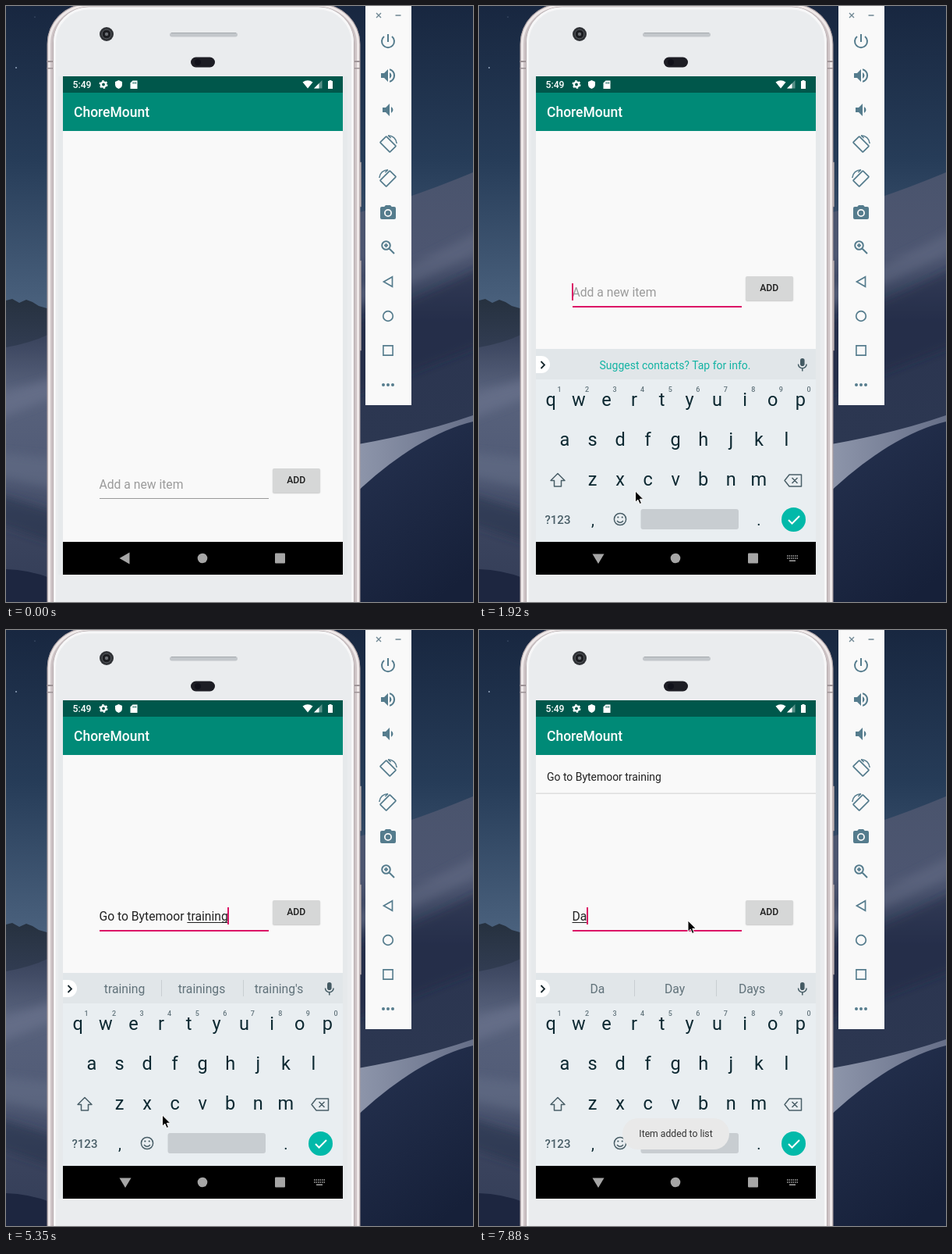
Animation of 599x763 px, one loop 8 s. Source, as an HTML page:

```html
<!DOCTYPE html>
<html lang="en">
<head>
<meta charset="utf-8">
<title>To-do app demo</title>
<style>
html, body { margin: 0; width: 100%; height: 100%; overflow: hidden; background: #1a2740; }
#stage { position: relative; width: 599px; height: 763px; overflow: hidden; font-family: Roboto, sans-serif; }
svg { position: absolute; left: 0; top: 0; }
text { font-family: Roboto, sans-serif; }
#form { position: absolute; left: 0; top: 0; width: 599px; height: 763px; }
#form.up { transform: translateY(-246px); }
#line { position: absolute; left: 119.5px; top: 630px; width: 217.5px; height: 1px; background: #999; }
#form.focus #line { height: 2px; background: #dc1466; }
#field { position: absolute; left: 119.5px; top: 601px; height: 22px; font-size: 15.7px; line-height: 23px; white-space: pre; color: #222; }
#hint { position: absolute; left: 0; top: 0; color: #9b9b9b; }
#word { text-decoration: underline 1px; text-underline-offset: 2px; text-decoration-skip-ink: none; }
#caret { position: absolute; top: 0; margin-left: -.5px; width: 2px; height: 22px; background: #dc1466; }
#add { position: absolute; left: 342px; top: 592px; width: 60.5px; height: 30.500px; border-radius: 2px; background: #d6d7d7; box-shadow: 0 1px 1.5px #0003; font-weight: 500; font-size: 12.2px; line-height: 31px; text-align: center; color: #1f1f1f; }
#add.press { background: #bfc0c0; box-shadow: 0 2px 4px #0006; }
</style>
</head>
<body>
<div id="stage">
<svg id="scene" width="599" height="763" viewBox="0 0 599 763">
  <defs>
    <linearGradient id="sky" x2="0" y2="390" gradientUnits="userSpaceOnUse">
      <stop stop-color="#182740"/><stop offset=".5" stop-color="#263c58"/><stop offset="1" stop-color="#4b627e"/>
    </linearGradient>
    <linearGradient id="hills" x2="0" y2="1">
      <stop stop-color="#26313f"/><stop offset="1" stop-color="#323d53"/>
    </linearGradient>
    <linearGradient id="duneL" x2="0" y1="425" y2="763" gradientUnits="userSpaceOnUse">
      <stop stop-color="#3a445d"/><stop offset=".2" stop-color="#58627c"/><stop offset=".5" stop-color="#515b76"/><stop offset=".75" stop-color="#3a435d"/><stop offset="1" stop-color="#333d57"/>
    </linearGradient>
    <linearGradient id="duneR" x2="0" y1="215" y2="560" gradientUnits="userSpaceOnUse">
      <stop stop-color="#4a546d"/><stop offset=".3" stop-color="#4d5671"/><stop offset=".55" stop-color="#2b3550"/><stop offset="1" stop-color="#2c3751"/>
    </linearGradient>
    <linearGradient id="glow" x1="453" x2="599" gradientUnits="userSpaceOnUse">
      <stop stop-color="#8d95aa"/><stop offset="1" stop-color="#666f88"/>
    </linearGradient>
    <linearGradient id="front" x1="470" y1="590" x2="580" y2="740" gradientUnits="userSpaceOnUse">
      <stop stop-color="#222e4b"/><stop offset="1" stop-color="#162039"/>
    </linearGradient>
    <filter id="soft" x="-50%" y="-50%" width="200%" height="200%"><feGaussianBlur stdDeviation="6"/></filter>
  </defs>

  <g id="wallpaper">
    <path fill="url(#sky)" d="M0 0H599V763H0z"/>
    <circle cx="13" cy="79" r=".9" fill="#9fb0c8"/><circle cx="37" cy="14" r=".6" fill="#6f819c"/>
    <path fill="url(#hills)" d="M0 377l8-2 9 5 9-4 8 3 8 5 14 4V440H0z"/>
    <path fill="url(#duneL)" d="M0 437Q30 432 56 420V763H0z"/>
    <g filter="url(#soft)">
      <path fill="#6d768f" opacity=".6" d="M-20 500Q30 488 70 472V498L-20 532z"/>
      <path fill="#66708a" opacity=".5" d="M-20 570L70 580V620L-20 600z"/>
      <path fill="#2a334b" opacity=".6" d="M-20 622L70 650V690L-20 660z"/>
    </g>
    <path fill="#1d2640" d="M0 721Q30 722 56 732V763H0z"/>
    <path fill="url(#duneR)" d="M440 268Q520 246 599 213V763H440z"/>
    <g filter="url(#soft)">
      <path fill="#676f87" opacity=".5" d="M440 365Q530 330 620 280V306Q540 352 440 388z"/>
      <path fill="#1e2842" opacity=".55" d="M440 410Q530 375 620 330V430L440 500z"/>
    </g>
    <path fill="url(#glow)" d="M440 563Q530 548 599 524V540L440 680z"/>
    <path fill="url(#front)" d="M440 632Q480 592 525 564Q565 540 599 532V763H440z"/>
  </g>

  <g id="phone">
    <path fill="#d6cdce" stroke="#93898c" stroke-width=".6" d="M335 -2h9v4h-9zM451 200h4.500v57H451zM451 326h4.500v115H451z"/>
    <rect x="53" y="-2.500" width="401" height="830" rx="51" fill="#cdc3c5" stroke="#a89ea1"/>
    <rect x="55.500" y="0" width="396" height="830" rx="49" fill="none" stroke="#efe9e9" stroke-width="3"/>
    <path fill="#9e9497" d="M52.500 70h8v2h-8zm0 9h8v1.500h-8zM446 70h8v2h-8zm0 9h8v1.500h-8z"/>
    <rect x="60.500" y="1" width="386" height="830" rx="46" fill="#eaecee" stroke="#b5abad"/>
    <rect x="62.500" y="3" width="382" height="830" rx="44" fill="none" stroke="#f7f7f8" stroke-width="3"/>
    <path fill="#e6e9eb" d="M67 90h6v638h-6zM432 90h6v638h-6z"/>
    <circle cx="129" cy="36" r="9" fill="#303236"/><circle cx="129" cy="36" r="5.800" fill="#1b1c20" stroke="#56595e"/>
    <circle cx="129" cy="36" r="2.200" fill="#6b6e73"/>
    <rect x="210" y="34" width="87" height="5.500" rx="2.700" fill="#c3c7cb"/><path stroke="#a5a9ae" d="M212 34.500h83"/>
    <rect x="237" y="65.500" width="31" height="13" rx="6.500" fill="#1d1d24"/><circle cx="246" cy="72" r="4" fill="#11111a"/>
  </g>

  <g id="app">
    <path fill="#f9f9f9" d="M73 90h359v638H73z"/>
    <path fill="#00574b" d="M73 90h359v21H73z"/>
    <path fill="#008a77" d="M73 111h359v49H73z"/>
    <g fill="#fff">
      <text x="85.500" y="105" font-size="12.2" font-weight="500">5:49</text>
      <text x="87" y="142" font-size="17.5" font-weight="500">ChoreMount</text>
      <circle cx="125" cy="100.500" r="3.100" fill="none" stroke="#fff" stroke-width="2.400"/>
      <circle cx="125" cy="100.500" r="4.700" fill="none" stroke="#fff" stroke-width="1.600" stroke-dasharray="2.460"/>
      <path d="M144.500 95l4.500 2v3.500q0 4-4.500 5.500q-4.500-1.500-4.500-5.500V97z"/>
      <path d="M162.500 95.500h6v10.500h-9v-7.500z"/><path fill="#00574b" d="M162.500 97.500h1v2h-1zm1.800 0h1v2h-1zm1.800 0h1v2h-1z"/>
      <path d="M380.500 97.500q6.500-4.500 13 0L387 105.500z"/>
      <path d="M405.500 95v10.500H395z" opacity=".35"/><path d="M401.500 99v6.500H395z"/>
      <path d="M414.500 95h3v1h1.500v10h-6V96h1.500z"/>
    </g>
    <g id="item">
      <text x="87" y="193" font-size="13.95" fill="#212121">Go to Bytemoor training</text>
      <path fill="#dedede" d="M73 208.500h359v1.500H73z"/>
    </g>
  </g>

  <g id="keyboard">
    <path fill="#e9eef1" d="M73 439h359v247H73z"/>
    <path fill="#e1e6e9" d="M73 439h359v39H73z"/>
    <path fill="#fff" d="M73 448h7a11 11 0 0 1 0 22h-7z"/>
    <path fill="none" stroke="#16262c" stroke-width="1.800" d="M79.500 455l4.500 4.500-4.500 4.500"/>
    <g fill="#445a63"><rect x="412" y="451" width="5.600" height="10" rx="2.800"/>
      <path fill="none" stroke="#445a63" stroke-width="1.500" d="M409.500 458.500a5.300 5.300 0 0 0 10.600 0M414.800 464v3.500"/></g>
    <text id="tip" x="251.500" y="464.500" font-size="14" text-anchor="middle" fill="#12b3a3">Suggest contacts? Tap for info.</text>
    <g id="words" font-size="15.7" text-anchor="middle" fill="#61727a">
      <path stroke="#c8ced2" d="M199.500 448v21M304.500 448v21"/>
      <text x="152" y="465"/><text x="251" y="465"/><text x="350" y="465"/>
    </g>
    <g id="keys" font-size="23.500" text-anchor="middle" fill="#0c2831"></g>
    <g fill="none" stroke="#4a5f68" stroke-width="1.500" stroke-linejoin="round">
      <path d="M101 598.500l9 9h-4.500v7.500h-9v-7.500H92z"/>
      <path d="M398 600h15.500v15H398l-6-7.500zM401.500 604l7 7m0-7l-7 7"/>
      <circle cx="181" cy="657" r="7.600"/><path d="M177 659q4 4.500 8 0"/>
      <path stroke-width="2.200" stroke-linecap="round" d="M178.300 654.500h.1M183.700 654.500h.1"/>
    </g>
    <text x="101" y="662.500" font-size="15" font-weight="500" text-anchor="middle" fill="#4a5f68">?123</text>
    <rect x="207.500" y="644" width="125.500" height="26" rx="3" fill="#c8cdd1"/>
    <circle cx="403.500" cy="657.500" r="15.500" fill="#02b9a9"/>
    <path fill="none" stroke="#fff" stroke-width="2" d="M397 658l4.500 4.500 9.500-9.500"/>
  </g>

  <g id="toast">
    <rect x="184" y="625" width="137" height="40" rx="20" fill="#e9e9e9"/>
    <text x="252.500" y="649" font-size="12.200" text-anchor="middle" fill="#333">Item added to list</text>
  </g>

  <g id="nav" fill="#a6a6a6">
    <path fill="#000" d="M73 686h359v42H73z"/>
    <circle cx="252" cy="707" r="6.300"/><rect x="345" y="700.500" width="13" height="13" rx="1"/>
    <path id="back" d="M145.500 707l13-7.500v15z"/>
    <g id="down"><path d="M145.500 701.500h15l-7.500 12.500z"/>
      <path stroke="#a6a6a6" stroke-width="1.500" stroke-dasharray="1.500 1" d="M395 704h14M395 707h14"/><path d="M398 709.500h8v1.500h-8z"/></g>
  </g>

  <g id="tools">
    <path fill="#f9f9f9" d="M461 0h59V511h-59z"/>
    <path fill="none" stroke="#6f8793" stroke-width="1.400" d="M475 9l6 6m0-6l-6 6M499.500 12h7"/>
  </g>
</svg>

<div id="form">
  <div id="field"><span id="hint">Add a new item</span><span id="text"></span><span id="word"></span><span id="caret"></span></div>
  <div id="line"></div>
  <div id="add">ADD</div>
</div>

<svg id="pointer" width="14" height="20" viewBox="-1 -1 14 20">
  <path d="M0 0V14.200L3.300 11.200L5.600 16.500L8 15.500L5.800 10.300H10.300z" stroke="#fff" stroke-width="1"/>
</svg>
</div>

<script>
const $ = id => document.getElementById(id);
const show = (id, on) => { $(id).style.display = on ? '' : 'none'; };

// Keyboard letters
const label = (x, y, s, extra = '') => `<text x="${x}" y="${y}" ${extra}>${s}</text>`;
const row = (chars, x, y) => [...chars].map((c, i) => label(x + i * 35.55, y, c)).join('');
const hints = [...'1234567890'].map((c, i) =>
  label(103 + i * 35.55, 494, c, 'font-size="9" font-weight="500" fill="#62747c"')).join('');
$('keys').innerHTML = row('qwertyuiop', 92.3, 511.5) + hints + row('asdfghjkl', 110, 563) +
  row('zxcvbnm', 145.5, 614) + label(146, 665, ',', 'font-size="20"') + label(359, 665, '.', 'font-size="20"');

// Emulator toolbar, 24-unit icons
const stroke = (d, w = 2) => `<path fill="none" stroke="#557c8d" stroke-width="${w}" d="${d}"/>`;
const fill = d => `<path fill-rule="evenodd" d="${d}"/>`;
const turn = stroke('M9.200 2.300L2.300 9.200q-.5.500 0 1L13.800 21.700q.5.500 1 0L21.700 14.800q.5-.5 0-1L10.200 2.300q-.5-.5-1 0z', 1.7) +
  stroke('M12 .8Q22 1.500 23.200 11M12 .8l3.700 3.200', 1.5);
const icons = [
  stroke('M12 3v10M7 6a8 8 0 1 0 10 0'),
  fill('M3 9v6h4l5 5V4L7 9zM14 8v8q2.500-1.300 2.500-4T14 8zM14 3.200v2.100a7 7 0 0 1 0 13.400v2.100a9 9 0 0 0 0-17.600z'),
  fill('M5 9v6h4l5 5V4L9 9zM16 8v8q2.500-1.300 2.500-4T16 8z'),
  turn,
  `<g transform="matrix(-1 0 0 1 24 0)">${turn}</g>`,
  fill('M9 2L7.200 4H4q-2 0-2 2v12q0 2 2 2h16q2 0 2-2V6q0-2-2-2h-3.200L15 2zM12 7a5 5 0 1 1 0 10a5 5 0 1 1 0-10zM12 8.800a3.200 3.200 0 1 0 0 6.400a3.200 3.200 0 1 0 0-6.400z'),
  stroke('M14.800 9.500a5.300 5.300 0 1 1-10.600 0a5.300 5.300 0 1 1 10.600 0M13.500 13.500l6.500 6.500M9.500 7v5M7 9.500h5'),
  stroke('M17.500 5.800V18.200L6.500 12z', 1.7),
  stroke('M18.300 12a6.300 6.300 0 1 1-12.600 0a6.300 6.300 0 1 1 12.600 0', 1.7),
  stroke('M5.900 5.900h12.200v12.200H5.900z', 1.6),
  fill('M4 12a2 2 0 1 1 4 0a2 2 0 1 1-4 0M10 12a2 2 0 1 1 4 0a2 2 0 1 1-4 0M16 12a2 2 0 1 1 4 0a2 2 0 1 1-4 0')
];
$('tools').innerHTML += icons.map((s, i) =>
  `<g fill="#557c8d" transform="translate(478 ${33 + i * 44})">${s}</g>`).join('');

// Timeline: each step changes part of the state
const type = (text, word, words) => ({ text, word, words: words && words.split('|'), caret: 1 });
const at = (x, y) => ({ pointer: [x, y] });
const go = 'Go to ', full = go + 'Bytemoor ';
const steps = [
  [0, { ...type('', '', ''), caret: 0, pointer: null, focus: 0, up: 0, slide: null, press: 0, item: 0, toast: 0, ink: '#9b9b9b' }],
  [600, at(228, 681)],
  [750, at(225, 681)],
  [1340, at(209, 645)],
  [1490, at(200.5, 621)],
  [1630, { focus: 1, caret: 1, ink: '#777' }],
  [1780, { up: 1, slide: 60, ink: '#9b9b9b' }],
  [1920, { slide: 0 }],
  [2220, { caret: 0 }],
  [2670, type('', 'G', 'G|Good|Go')],
  [2820, type('', 'Go', 'Go|Good|Got')],
  [2960, type('Go ', '', 'to|for|and')],
  [3110, type('Go ', 'to', 'to|too|the')],
  [3260, type(go, '', 'bed|the|a')],
  [3560, type(go, 'B', 'B|Bed|But')],
  [3710, type(go, 'By', 'By|Bye|Byte')],
  [3860, type(go, 'Byte', 'Byte|Bytes|Byte\'s')],
  [4010, type(go, 'Bytem', 'Bytem|Bytes|Byte')],
  [4160, type(go, 'Bytemoo', 'Bytemoo|Bytes|Byte')],
  [4310, type(go, 'Bytemoor', 'Bytemoor|Bytemoors|Bytemoor\'s')],
  [4460, type(full, '', 'and|to|for')],
  [4610, type(full, 'tr', 'tr|try|true')],
  [4760, type(full, 'tra', 'tra|train|travel')],
  [4910, type(full, 'trai', 'trai|train|trail')],
  [5060, type(full, 'train', 'train|training|trains')],
  [5200, type(full, 'trainin', 'trainin|training|train')],
  [5350, type(full, 'training', 'training|trainings|training\'s')],
  [5500, at(290, 480)],
  [5650, at(369, 373)],
  [5800, at(371, 367)],
  [5950, { caret: 0 }],
  [6100, { press: 1 }],
  [6250, { ...type('', '', ''), item: 1 }],
  [6390, { press: 0 }],
  [6540, { toast: .75 }],
  [6690, { toast: 1, ...at(320, 370) }],
  [6840, { caret: 0, ...at(268, 372) }],
  [7280, { caret: 1 }],
  [7730, type('', 'D', 'D|Do|Day')],
  [7880, type('', 'Da', 'Da|Day|Days')]
];

function draw(s) {
  show('item', s.item);
  show('hint', !s.text && !s.word);
  $('hint').style.color = s.ink;
  $('text').textContent = s.text;
  $('word').textContent = s.word;
  show('caret', s.caret);
  $('form').className = (s.up ? 'up ' : '') + (s.focus ? 'focus' : '');
  $('add').className = s.press ? 'press' : '';

  const open = s.slide !== null;
  show('keyboard', open);
  $('keyboard').setAttribute('transform', `translate(0 ${s.slide || 0})`);
  $('keyboard').setAttribute('opacity', s.slide ? .8 : 1);
  show('back', !open);
  show('down', open);
  show('tip', !s.words);
  show('words', s.words);
  if (s.words) document.querySelectorAll('#words text').forEach((t, i) => { t.textContent = s.words[i]; });

  $('toast').setAttribute('opacity', s.toast);
  show('pointer', s.pointer);
  if (s.pointer) $('pointer').style.transform = `translate(${s.pointer[0] - 1}px, ${s.pointer[1] - 1}px)`;
}

let last = -1;
function tick(now) {
  const t = now % 8000;
  const n = steps.filter(([start]) => start <= t).length;
  if (n !== last) draw(Object.assign({}, ...steps.slice(0, n).map(step => step[1])));
  last = n;
  requestAnimationFrame(tick);
}
tick(0);
</script>
</body>
</html>
```
